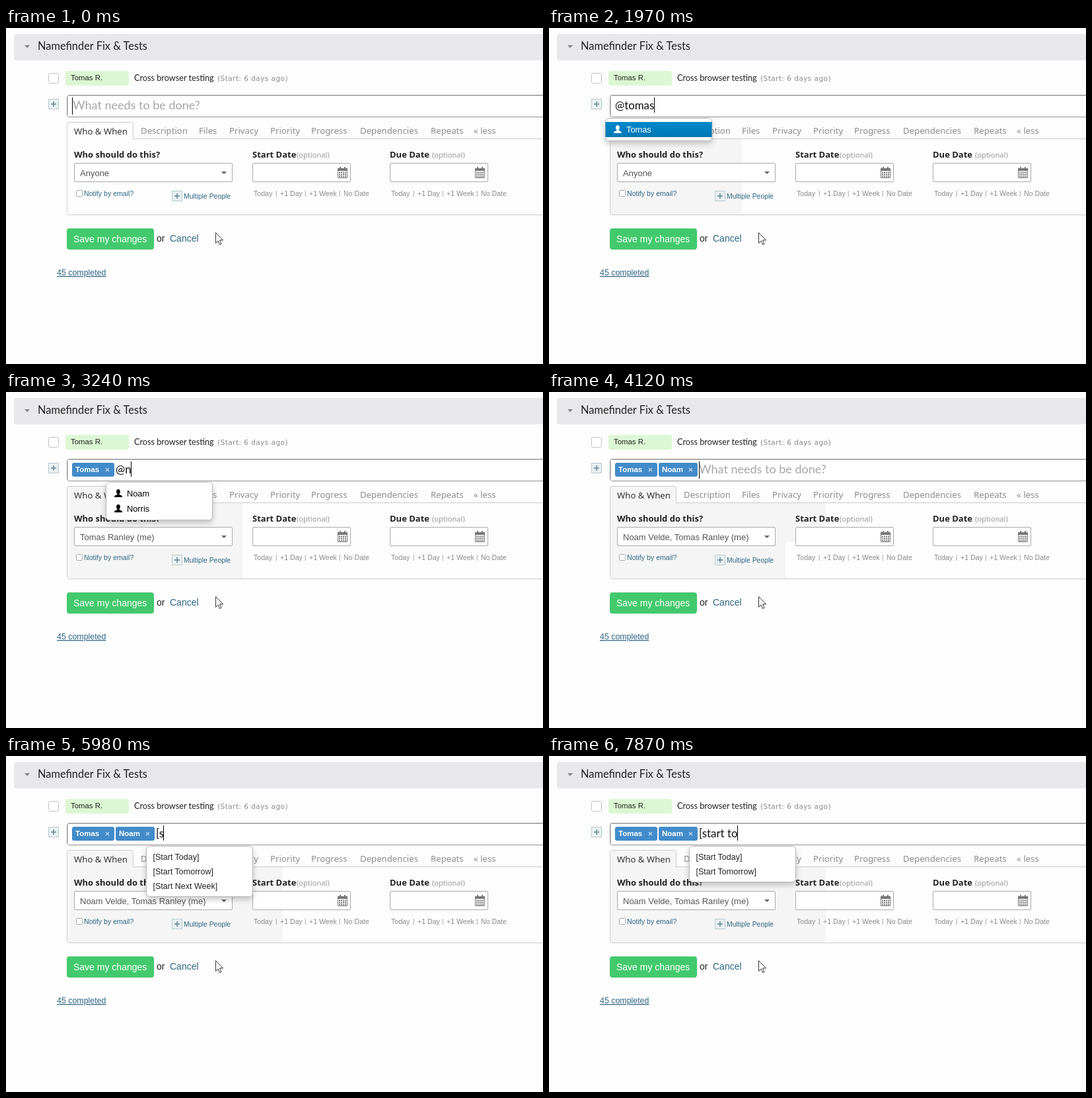
These frames come from a looping animation (813x508 px, 8 s). An HTML page:

```html
<!DOCTYPE html>
<html lang="en">
<head>
<meta charset="utf-8">
<title>Task entry with suggestions</title>
<style>
html, body { margin: 0; width: 100%; height: 100%; overflow: hidden; background: #fdfdfd; }
svg { display: block; }
text { font: 13px "Liberation Sans", Arial, sans-serif; fill: #222; white-space: pre; }
.lato text, text.lato { font-family: Lato, sans-serif; }
.tabs text { font: 13.2px "Noto Sans", sans-serif; fill: #8c8c8c; }
.labels text { font: 600 13px "Noto Sans", sans-serif; }
.labels .opt { font: 11.1px "Noto Sans", sans-serif; fill: #999; }
.links text { font-size: 10.6px; fill: #8a8a8a; }
text.link { fill: #2f6685; }
.box { fill: #fff; stroke: #a9a9a9; }
.line { fill: none; stroke: #ccc; }
#menu .frame { fill: #fff; stroke: #b8b8b8; filter: drop-shadow(0 4px 4px rgba(0, 0, 0, .22)); }
</style>
</head>
<body>
<svg width="813" height="508" viewBox="0 0 813 508">
  <defs>
    <linearGradient id="blue" x2="0" y2="1">
      <stop stop-color="#0088cc"/><stop offset="1" stop-color="#0077b3"/>
    </linearGradient>
    <g id="plus">
      <rect x=".5" y=".5" width="15" height="15" fill="#e9f1f4" stroke="#b9c9d0"/>
      <path d="M4 8H12M8 4V12" stroke="#7f98a3" stroke-width="2"/>
    </g>
    <g id="person">
      <ellipse cx="6" cy="3.4" rx="2.9" ry="3.5"/>
      <path d="M4.4 5H7.6V8L11 9.4Q12 10 12 12H0Q0 10 1 9.4L4.4 8Z"/>
    </g>
    <g id="date">
      <rect class="box" x=".5" y=".5" width="148" height="28" rx="1.5"/>
      <path d="M129.5 8.5H143.5V22.5H129.5Z" fill="#fff" stroke="#777"/>
      <path d="M129 8H144V12H129ZM132 6H134V9H132ZM139 6H141V9H139Z" fill="#777"/>
      <path d="M131 14.5H143M131 17.5H143M131 20.5H143" stroke="#777" stroke-width="2" stroke-dasharray="2 1"/>
    </g>
    <g id="shortcuts" class="links">
      <text x="2">Today</text><text x="35" y="-1" style="font-size:9px">|</text>
      <text x="42">+1 Day</text><text x="79" y="-1" style="font-size:9px">|</text>
      <text x="86">+1 Week</text><text x="131" y="-1" style="font-size:9px">|</text>
      <text x="138">No Date</text>
    </g>
  </defs>

  <rect x="12" y="9" width="820" height="40" rx="4" fill="#e8e8ec"/>
  <path d="M28 26H36L32 30.5Z" fill="#888"/>
  <text class="lato" x="48" y="33" style="font-size:16.4px">Namefinder Fix &amp; Tests</text>

  <rect class="box" x="64.5" y="68.5" width="15" height="15" rx="2" style="stroke:#c0c0c0"/>
  <rect x="90" y="65" width="96" height="22" rx="3" fill="#dcf7d3"/>
  <text x="98" y="79" style="font-size:11.4px">Tomas R.</text>
  <text class="lato" x="194" y="80" style="font-size:12.7px">Cross browser testing</text>
  <text x="320" y="80" style="font:10.5px 'DejaVu Sans',sans-serif;letter-spacing:.45px;fill:#8a8a8a">(Start: 6 days ago)</text>

  <use href="#plus" x="64" y="107"/>
  <rect x="92.5" y="101.5" width="740" height="33" rx="3" fill="#fff" stroke="#929292"/>
  <path d="M93.5 134V102.5H813" class="line"/>

  <path id="shadeTop" fill="#f5f5f5"/>
  <path id="shadeLow" fill="#f5f5f5"/>
  <path class="line" d="M92.5 168V145.5Q92.5 142.5 95.5 142.5H189.5Q192.5 142.5 192.5 145.5V167.5H813M92.5 168V278.5Q92.5 282.5 96.5 282.5H813"/>
  <g class="tabs">
    <text x="103" y="161" style="fill:#333">Who &amp; When</text>
    <text x="204" y="160">Description</text>
    <text x="292" y="160">Files</text>
    <text x="338" y="160">Privacy</text>
    <text x="400" y="160">Priority</text>
    <text x="462" y="160">Progress</text>
    <text x="536" y="160">Dependencies</text>
    <text x="643" y="160">Repeats</text>
    <text x="708" y="160">« less</text>
  </g>
  <g class="labels">
    <text x="103" y="196">Who should do this?</text>
    <text x="373" y="196">Start Date</text><text class="opt" x="440" y="196">(optional)</text>
    <text x="581" y="196">Due Date</text><text class="opt" x="645" y="196">(optional)</text>
  </g>
  <rect class="box" x="103.5" y="204.5" width="239" height="28" rx="1.5"/>
  <path d="M326 217H334L330 221Z" fill="#666"/>
  <text id="who" x="112" y="224" style="fill:#555"></text>
  <use href="#date" x="373" y="204"/>
  <use href="#date" x="581" y="204"/>
  <use href="#shortcuts" x="373" y="254"/>
  <use href="#shortcuts" x="581" y="254"/>
  <rect class="box" x="106.5" y="245.5" width="9" height="9" rx="1"/>
  <text class="link" x="118" y="254" style="font-size:10.6px">Notify by email?</text>
  <use href="#plus" x="251" y="246"/>
  <text class="link" x="269" y="258" style="font-size:10.4px">Multiple People</text>

  <rect x="92" y="303" width="132" height="32" rx="4" fill="#43c96d"/>
  <text x="102" y="324" style="font-size:14px;fill:#fff">Save my changes</text>
  <text x="228" y="323" style="font-size:14px">or</text>
  <text class="link" x="248" y="323" style="font-size:14px">Cancel</text>
  <text class="link" x="77" y="374" style="font-size:12.4px;text-decoration:underline">45 completed</text>

  <g id="chips"></g>
  <text id="hint" class="lato" y="123" style="font-size:18px;fill:#a6a6a6">What needs to be done?</text>
  <text id="typed" class="lato" y="123" style="font-size:16.9px;fill:#111"></text>
  <rect id="caret" y="105" width="1" fill="#000"/>
  <g id="menu"></g>
  <path d="M317.5 309.5V325.2L321.1 321.8L323.6 327.5L326 326.5L323.5 320.8H328.6Z" fill="#fff" stroke="#333"/>
</svg>
<script>
const LOOP = 8000;
const names = ["Noam", "Norris", "Otis", "Rafael", "Roald", "Salvatore", "Tomas", "Wolf"];
const dates = ["Start", "Due"].flatMap(k => ["Today", "Tomorrow", "Next Week"].map(d => `[${k} ${d}]`));
const people = ["Anyone", "Tomas Ranley (me)", "Noam Velde, Tomas Ranley (me)"];
const chips = [{ name: "Tomas", x: 100, w: 64 }, { name: "Noam", x: 166, w: 59 }];
const starts = [100, 166, 227];

// Each track lists [start time, value].
const typing = [
  [0, ""], [720, "@"], [1280, "@t"], [1420, "@to"], [1550, "@tom"], [1830, "@toma"], [1970, "@tomas"],
  [2250, ""], [2970, "@"], [3240, "@n"], [3520, "@no"], [3670, "@noa"], [3980, "@noam"],
  [4120, ""], [5150, "["], [5980, "[s"], [6260, "[sta"], [6570, "[star"], [6690, "[start"],
  [7130, "[start "], [7710, "[start t"], [7870, "[start to"]
];
const chosen = [[0, 0], [2250, 1], [4120, 2]];
const caretOn = [[0, 1], [310, 0], [720, 1], [2710, 0], [2970, 1], [4690, 0], [5150, 1], [5550, 0], [5980, 1]];
const topEdge = [[0, 93], [720, 292], [2250, 358], [4120, 419]];
const lowEdge = [[0, 93], [720, 292], [2970, 358], [5150, 419]];

const at = (track, t) => track.findLast(step => step[0] <= t)[1];
const el = id => document.getElementById(id);
const set = (id, attrs) => { for (const k in attrs) el(id).setAttribute(k, attrs[k]); };

function chipMarkup({ name, x, w }, crossColor) {
  const cx = x + w - 10.5;
  return `<rect x="${x}" y="107" width="${w}" height="21" rx="3" fill="#428bca"/>
    <text x="${x + 5}" y="121" style="font-size:11.5px;font-weight:bold;fill:#fff">${name}</text>
    <path d="M${cx - 2.5} 115l5 5m0 -5l-5 5" stroke="${crossColor}" stroke-width="1.6"/>`;
}

function menuMarkup(text, x) {
  if (!text) return "";
  const isName = text[0] === "@";
  const query = isName ? text.slice(1) : text;
  const items = (isName ? names : dates).filter(s => s.toLowerCase().startsWith(query));
  const row = isName ? 23 : 22;
  const active = items.length === 1;
  const color = active ? "#fff" : "#000";
  const frame = `<rect class="frame" x="${x}" y="136.5" width="161" height="${row * items.length + (isName ? 11 : 10)}" rx="5"/>`;
  const bar = active ? `<rect x="${x}" y="142" width="161" height="23" fill="url(#blue)"/>` : "";
  return frame + bar + items.map((item, i) => isName
    ? `<use href="#person" x="${x + 12.5}" y="${147 + row * i}" fill="${color}"/>
       <text x="${x + 31.5}" y="${158 + row * i}" style="font-size:12.8px;fill:${color}">${item}</text>`
    : `<text x="${x + 10}" y="${157 + row * i}" style="font-size:12.5px">${item}</text>`).join("");
}

let last;
function draw(t) {
  const text = at(typing, t), count = at(chosen, t), blink = at(caretOn, t);
  const top = at(topEdge, t), low = at(lowEdge, t);
  const fresh = t >= 2250 && t < 2400;
  const key = [text, count, blink, top, low, fresh].join();
  if (key === last) return;
  last = key;

  const x = starts[count];
  el("who").textContent = people[count];
  el("typed").textContent = text;
  set("typed", { x });
  set("hint", { x: x + (count ? 0 : 1), visibility: text ? "hidden" : "visible" });
  const end = text ? Math.floor(x + el("typed").getComputedTextLength()) : x;
  set("caret", { x: end, height: text ? 23 : 26, visibility: blink ? "visible" : "hidden" });
  el("chips").innerHTML = chips.slice(0, count).map(c => chipMarkup(c, fresh ? "#6fa7d7" : "#b3d1ea")).join("");
  el("menu").innerHTML = menuMarkup(text, x - 14.5);
  set("shadeTop", { d: top > 93 ? `M93 143H192V168H${top}V227H93Z` : "" });
  set("shadeLow", { d: `M93 227H${low}V282H96L93 279Z`, visibility: low > 93 ? "visible" : "hidden" });
}

const begin = performance.now();
function tick() {
  draw((performance.now() - begin) % LOOP);
  requestAnimationFrame(tick);
}
tick();
</script>
</body>
</html>
```
